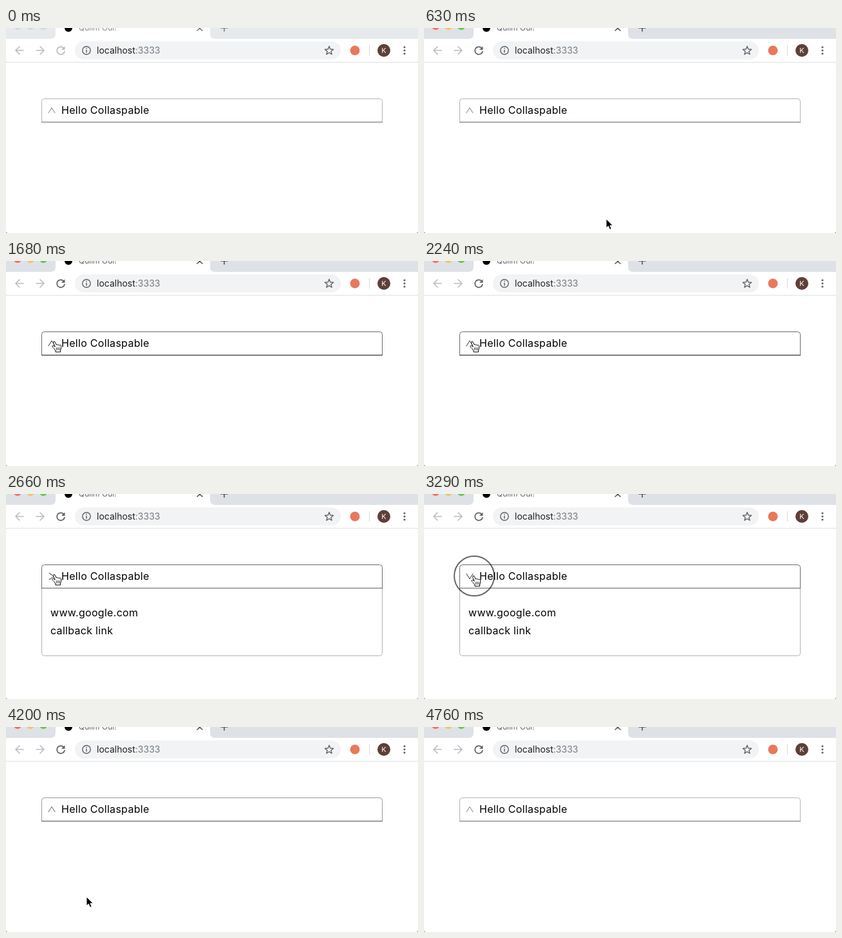
These frames come from a looping animation (640x320 px, 4970 ms). An HTML page:

```html
<!DOCTYPE html>
<html lang="en">
<head>
<meta charset="utf-8">
<title>Collapsible panel</title>
<style>
  html, body { margin: 0; width: 100%; height: 100%; overflow: hidden; background: #777; }
  svg { display: block; width: 100%; height: 100%; }
  text { font-family: Inter, "Open Sans", sans-serif; }
  .page { font-size: 16px; letter-spacing: .3px; fill: #000; }
  .line { fill: none; stroke-linecap: round; stroke-linejoin: round; }
</style>
</head>
<body>
<svg viewBox="0 0 640 320">
  <defs>
    <clipPath id="window"><rect y="-10" width="640" height="330" rx="3"/></clipPath>
    <clipPath id="panelClip"><rect id="panelWindow" x="50" y="147" width="540" height="0"/></clipPath>
  </defs>
  <g clip-path="url(#window)">
    <rect width="640" height="320" fill="#fff"/>

    <!-- Tab strip -->
    <rect id="strip" width="640" height="17"/>
    <path d="M69 17Q77 17 77 9V0H317V9Q317 17 325 17Z" fill="#fff"/>
    <g id="lights">
      <circle cx="18" cy="-3" r="6"/>
      <circle cx="38" cy="-3" r="6"/>
      <circle cx="58" cy="-3" r="6"/>
    </g>
    <circle cx="97" cy="0" r="6" fill="#000"/>
    <text id="tabTitle" x="113" y="4" font-size="12">Quilm Oui!</text>
    <path id="tabIcons" class="line" d="M297 -3L305 4M305 -3L297 4M334 0H344M339 -5V5" stroke-width="1.6"/>

    <!-- Toolbar -->
    <path d="M0 53.5H640" stroke="#dfe1e3"/>
    <path class="line" stroke="#babcbe" stroke-width="1.6"
      d="M27 35H15M21 29L15 35L21 41M47 35H59M53 29L59 35L53 41"/>
    <g id="reload">
      <path class="line" d="M89.5 31.2A6 6 0 1 0 91 36.5" stroke-width="1.7"/>
      <path d="M91.5 28.5V34H86Z" stroke="none"/>
    </g>
    <rect x="107" y="21" width="413" height="28" rx="14" fill="#f1f3f4"/>
    <circle cx="125" cy="35" r="6.2" fill="none" stroke="#5f6368" stroke-width="1.4"/>
    <path d="M125 34V38.5M125 31V32.5" stroke="#5f6368" stroke-width="1.5"/>
    <text x="141" y="40" font-size="14" fill="#202124">localhost<tspan fill="#777b80">:3333</tspan></text>
    <path id="star" class="line" stroke="#5f6368" stroke-width="1.4"/>
    <circle cx="542" cy="35" r="7.5" fill="#e8795a"/>
    <path d="M564.5 27V43" stroke="#d5d7da"/>
    <circle cx="587" cy="35" r="10" fill="#5d4037"/>
    <text x="587" y="39" font-size="11" fill="#fff" text-anchor="middle">K</text>
    <g fill="#5f6368">
      <circle cx="619" cy="30" r="1.6"/><circle cx="619" cy="35" r="1.6"/><circle cx="619" cy="40" r="1.6"/>
    </g>

    <!-- Collapsible -->
    <g clip-path="url(#panelClip)">
      <path id="panel" fill="none" stroke="#b3b3b3"/>
      <g class="page">
        <text x="69" y="191">www.google.com</text>
        <text x="69" y="219">callback link</text>
      </g>
    </g>
    <path id="header" d="M55.5 147V114.5Q55.5 110.5 59.5 110.5H580.5Q584.5 110.5 584.5 114.5V147" fill="none"/>
    <path id="headerBase" d="M55 147H585"/>
    <path id="chevron" class="line" d="M-5 4L0 -4L5 4" stroke-width="1"/>
    <text class="page" x="86" y="134">Hello Collaspable</text>

    <!-- Pointer -->
    <circle id="ring" r="31" fill="none" stroke="#000" stroke-opacity=".6" stroke-width="2"/>
    <path id="arrow" d="M0 0V14.2L3.3 11.2L5.6 16.6L8.2 15.5L5.9 10.3H10.3Z" fill="#000" stroke="#fff"/>
    <g id="hand" class="line" stroke="#000">
      <path fill="#fff" d="M-1.5 0C-2.6 .3 -2.6 1.6 -2.2 2.5L.3 8C-1 6.5 -3.5 5.5 -4.3 7C-4.7 8 -3 8.7 -1.5 10.5L1 14V16H8.5V14L9.5 10C10 7 9.7 5.5 8.5 5.2C7.8 5 7.2 5.3 7 5.8C6.5 4.6 5 4.3 4.4 5.2C3.8 4.2 2.4 4.2 2 4.8L.5 1C0 0 -.8 -.2 -1.5 0Z"/>
      <path d="M2.6 9.5V13M4.8 9.5V13M7 9.5V13" stroke-width=".8"/>
    </g>
  </g>
</svg>
<script>
const LOOP = 4970, STEP = 70;
const $ = id => document.getElementById(id);
const set = (id, attrs) => {
  for (const name in attrs) $(id).setAttribute(name, attrs[name]);
};
const ramp = (t, from, to) => Math.min(1, Math.max(0, (t - from) / (to - from)));
const pulse = (t, on, onEnd, off, offEnd) => ramp(t, on, onEnd) - ramp(t, off, offEnd);
const gray = (from, to, k) => {
  const v = Math.round(from + (to - from) * k);
  return `rgb(${v},${v},${v})`;
};

// Pointer tip: time, x, y
const path = [
  [0, 310, 340], [210, 310, 332], [350, 301, 315], [490, 289, 302], [630, 283, 298],
  [770, 283, 298], [910, 242, 257], [1050, 142, 176], [1120, 106, 146], [1190, 90, 128],
  [1330, 83, 123], [1680, 76, 126], [3080, 76, 126], [3290, 78, 128], [3990, 78, 128],
  [4060, 82, 140], [4130, 100, 190], [4200, 125, 265], [4270, 145, 340], [LOOP, 145, 340]
];

function pointerAt(t) {
  const i = path.findIndex(key => key[0] > t);
  const [t0, x0, y0] = path[i - 1], [t1, x1, y1] = path[i];
  const k = ramp(t, t0, t1);
  return [x0 + (x1 - x0) * k, y0 + (y1 - y0) * k];
}

$('star').setAttribute('d', 'M' + Array.from({ length: 10 }, (_, i) => {
  const r = i % 2 ? 3 : 7, a = i * Math.PI / 5;
  return `${502 + r * Math.sin(a)} ${35.5 - r * Math.cos(a)}`;
}).join('L') + 'Z');

function drawWindow(active) {
  const colors = active ? ['#f46d65', '#f6c251', '#62c554'] : Array(3).fill('#d6d9dc');
  [...$('lights').children].forEach((light, i) => light.setAttribute('fill', colors[i]));
  const icon = active ? '#5f6368' : '#babcbe';
  set('strip', { fill: active ? '#dee1e6' : '#e7eaed' });
  set('tabTitle', { fill: active ? '#5f6368' : '#85898d' });
  set('tabIcons', { stroke: active ? '#505357' : '#77797c' });
  set('reload', { stroke: icon, fill: icon });
}

function drawCollapsible(t) {
  const hover = pulse(t, 1120, 1330, 4060, 4270);
  const open = pulse(t, 2450, 2660, 3430, 3640);
  const turn = 180 * pulse(t, 2520, 2800, 3500, 3780);
  const bottom = 147 + 105.5 * open;
  set('panelWindow', { height: open ? bottom - 146 : 0 });
  set('panel', { d: `M55.5 147V${bottom - 4}q0 4 4 4H580.5q4 0 4 -4V147` });
  set('header', { stroke: gray(179, 105, hover) });
  set('headerBase', { stroke: gray(145, 85, hover), 'stroke-width': open ? 1 : 1.6 });
  set('chevron', { stroke: gray(125, 40, hover), transform: `translate(71 128.5) rotate(${turn})` });
}

function drawPointer(t) {
  const [x, y] = pointerAt(t);
  const overHeader = y > 110 && y < 147;
  const transform = `translate(${x} ${y})`;
  const pressed = (t >= 2380 && t < 2520) || (t >= 3290 && t < 3500);
  set('hand', { transform, visibility: overHeader ? 'visible' : 'hidden' });
  set('arrow', { transform, visibility: overHeader ? 'hidden' : 'visible' });
  set('ring', { transform, visibility: pressed ? 'visible' : 'hidden' });
}

function render(now) {
  const t = Math.floor(now % LOOP / STEP) * STEP;
  drawWindow(t >= 140);
  drawCollapsible(t);
  drawPointer(t);
  requestAnimationFrame(render);
}
render(0);
</script>
</body>
</html>
```
